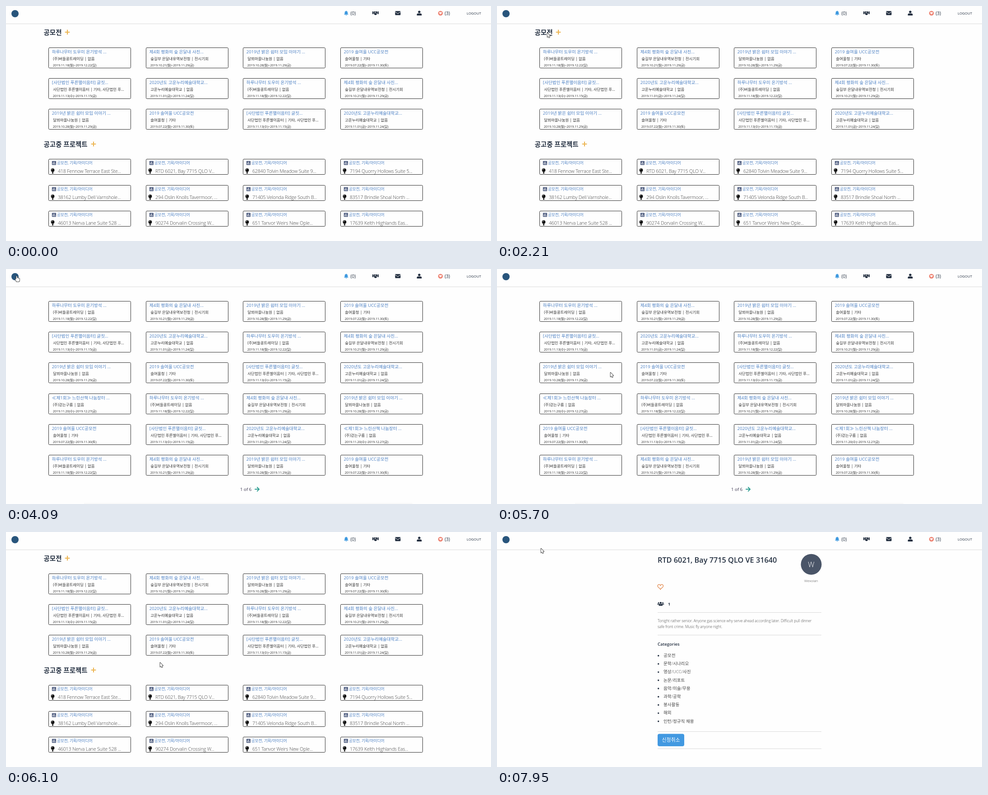
These frames come from a looping animation (1075 px wide and 521 px high, 8 s). An HTML page with a canvas:

```html
<!DOCTYPE html>
<html lang="ko">
<head>
<meta charset="utf-8">
<style>
html, body { margin: 0; width: 100%; height: 100%; overflow: hidden; background: #fefefe; }
canvas { display: block; }
</style>
</head>
<body>
<canvas id="stage" width="1075" height="521"></canvas>
<script>
const ctx = document.getElementById('stage').getContext('2d');
const LOOP = 8000, TICK = 75;
const INK = '#232f40', LINK = '#4a7fc3', PAPER = '#fefefe', GOLD = '#ecb450';
const FAMILY = '"Open Sans", "Noto Sans CJK KR", "Noto Sans CJK", sans-serif';
const CARD_W = 182, LINK_W = 150;

const contests = {
  A: ['하루나무터 도우미 온기방석 ...', '(주)버들콩트레이딩 | 없음', '11.18(월)~2019.12.22(일)'],
  B: ['제4회 평화의 숲 은달내 사진...', '숲길부 은달내유역보전청 | 전시기회', '10.21(월)~2019.11.29(금)'],
  C: ['2019년 밝은 쉼터 모임 이야기 ...', '달뫼마을나눔원 | 없음', '10.28(월)~2019.11.29(금)'],
  D: ['2019 솔여울 UCC공모전', '솔여울청 | 기타', '07.22(월)~2019.11.30(토)'],
  E: ['[사단법인 푸른별이음터] 글짓...', '사단법인 푸른별이음터 | 기타, 사단법인 푸...', '11.13(수)~2019.11.15(금)'],
  F: ['2020년도 고운누리예술대학교...', '고운누리예술대학교 | 없음', '11.01(금)~2019.11.24(일)'],
  G: ['≪제1회≫ 느린산책 나눔장터 ...', '(주)걷는구름 | 없음', '11.20(수)~2019.12.27(금)']
};
const projects = [
  '418 Fennow Terrace East Ste...', 'RTD 6021, Bay 7715 QLO V...', '62840 Tolvin Meadow Suite 9...', '7194 Quorry Hollows Suite 5...',
  '38162 Lumby Dell Varnshole...', '294 Oslin Knolls Tavermoor, ...', '71405 Velonda Ridge South B...', '83517 Brindle Shoal North ...',
  '46013 Nerva Lane Suite 528 ...', '90274 Dorvalin Crossing W...', '651 Tanvor Weirs New Ople...', '17639 Kelth Highlands Eas...'
];
const categories = ['공모전', '문학/시나리오', '영상/UCC/사진', '논문/리포트', '음악/미술/무용',
  '과학/공학', '봉사활동', '해외', '인턴/정규직 채용'];

// Card grids: first row's top, distance between rows, card height
const homeContests = { count: 12, top: 92, step: 68.2, h: 45 };
const allContests = { count: 24, top: 71.4, step: 68.2, h: 45 };
const homeProjects = { count: 12, top: 339.6, step: 57.4, h: 34 };

// Pointer strokes, each going straight on from where the last one ended
const strokes = [
  { at: 1060, ticks: 2, x: 1014, y: 491 },
  { at: 1280, ticks: 6, x: 330, y: 202 },
  { at: 1730, ticks: 5, x: 87, y: 69 },
  { at: 2130, ticks: 4, x: 135, y: 49 },
  { at: 2830, ticks: 8, x: 24, y: 15 },
  { at: 5160, ticks: 8, x: 251, y: 229 },
  { at: 5760, ticks: 5, x: 341, y: 289 },
  { at: 6170, ticks: 3, x: 488, y: 360 },
  { at: 6395, ticks: 2, x: 357, y: 341 },
  { at: 6710, ticks: 2, x: 360, y: 348 },
  { at: 7270, ticks: 10, x: 97, y: 36 }
];

function text(str, x, y, size, color = INK, weight = 400, spacing = 0, align = 'left') {
  ctx.font = `${weight} ${size}px ${FAMILY}`;
  ctx.letterSpacing = spacing + 'px';
  ctx.textAlign = align;
  ctx.fillStyle = color;
  ctx.fillText(str, x, y);
}

function disc(x, y, r, color) {
  ctx.fillStyle = color;
  ctx.beginPath();
  ctx.arc(x, y, r, 0, 7);
  ctx.fill();
}

function box(x, y, w, h, r, fill, stroke) {
  ctx.beginPath();
  ctx.roundRect(x, y, w, h, r);
  if (fill) { ctx.fillStyle = fill; ctx.fill(); }
  if (stroke) { ctx.strokeStyle = stroke; ctx.lineWidth = 1; ctx.stroke(); }
}

function line(color, width, ...points) {
  ctx.strokeStyle = color;
  ctx.lineWidth = width;
  ctx.lineCap = ctx.lineJoin = 'round';
  ctx.beginPath();
  points.forEach(p => ctx.lineTo(...p));
  ctx.stroke();
}

function rule(x, y, w, color) {
  ctx.fillStyle = color;
  ctx.fillRect(x, y, w, 1);
}

function bell(x, y, color) {
  disc(x, y - 4.5, .9, color);
  box(x - 3.3, y - 4.6, 6.6, 7, [3.3, 3.3, 0, 0], color);
  box(x - 4.6, y + 1.4, 9.2, 1.7, .8, color);
  box(x - 1.4, y + 3.7, 2.8, 1.5, [0, 0, 1.4, 1.4], color);
}

function handshake(x, y) {
  for (const side of [-1, 1]) box(x + side * 5.9 - 1.1, y - 3.6, 2.2, 6.2, .3, INK);
  box(x - 4.2, y - 3.6, 8.4, 6, [1.5, 1.5, 2, 2], INK);
  box(x - 2.6, y + 1, 5.2, 3.4, 1.6, INK);
  line(PAPER, .8, [x + 3, y + 1.8], [x + .4, y - 1], [x - 1.8, y], [x, y - 3]);
}

function envelope(x, y) {
  box(x - 6, y - 4.5, 12, 9, 1.2, INK);
  line(PAPER, 1, [x - 6, y - 2.8], [x, y + 1.2], [x + 6, y - 2.8]);
}

function person(x, y, r) {
  disc(x, y - r / 2, r / 2, INK);
  box(x - r, y + r * .14, 2 * r, r * .8, [r * .5, r * .5, r * .1, r * .1], INK);
}

function heart(x, y, size, fill, stroke) {
  ctx.beginPath();
  for (let a = 0; a < 6.3; a += .1) {
    const up = 13 * Math.cos(a) - 5 * Math.cos(2 * a) - 2 * Math.cos(3 * a) - Math.cos(4 * a);
    ctx.lineTo(x + size * Math.sin(a) ** 3, y - size * up / 16);
  }
  ctx.closePath();
  if (fill) { ctx.fillStyle = fill; ctx.fill(); }
  if (stroke) { ctx.strokeStyle = stroke; ctx.lineWidth = 1.3; ctx.stroke(); }
}

function bulb(x, y) {
  disc(x, y - 2, 3.9, '#111');
  box(x - 1.7, y, 3.4, 2.6, 0, '#111');
  box(x - 1.6, y + 3.2, 3.2, 2.4, [0, 0, 1, 1], '#111');
  line('#fff', .7, [x - 2.1, y - 2.3], [x - 1.4, y - 3.6], [x - .2, y - 4.1]);
}

function chart(x, y) {
  box(x, y, 9.3, 9, 1, '#5d6a8a');
  [2.8, 5.2, 1.6].forEach((h, i) => box(x + 1.7 + i * 2.4, y + 7.1 - h, 1.2, h, 0, '#fff'));
}

function plus(x, y) {
  line(GOLD, 2.2, [x - 4.5, y], [x + 4.5, y]);
  line(GOLD, 2.2, [x, y - 4.5], [x, y + 4.5]);
}

function header() {
  disc(20, 17, 8, '#28557c');
  rule(0, 39, 1075, '#dcdcdc');
  bell(754, 16, '#3f9ae0');
  text('(0)', 763.5, 20, 10);
  handshake(819, 15.5);
  envelope(868.5, 15.7);
  person(916, 15.8, 5.4);
  disc(963, 16, 5.3, '#ee8777');
  heart(963, 15.7, 2.9, '#fff');
  text('(3)', 972.3, 20, 10);
  text('LOGOUT', 1021, 19, 7.9);
}

function cardAt(grid, i) {
  return {
    x: Math.floor(94.5 + (i % 4) * 215.7) + .5,
    y: Math.floor(grid.top + Math.floor(i / 4) * grid.step) + .5
  };
}

function cards(grid, content) {
  for (let i = 0; i < grid.count; i++) {
    const { x, y } = cardAt(grid, i);
    box(x, y, CARD_W, grid.h, 2, null, '#333');
    content(i, x, y);
  }
}

function contest(i, x, y) {
  const key = i < 12 ? 'ABCDEF'[i % 6] : 'GABCDEF'[(i - 12) % 7];
  const [title, host, dates] = contests[key];
  text(title, x + 7.3, y + 12.2, 9.6, LINK);
  text(host, x + 9.8, y + 27.5, 8.5, '#333');
  text('2019.' + dates, x + 9.3, y + 41.7, 7.4, '#333', 400, -.2);
}

function project(i, x, y) {
  chart(x + 7.3, y + 4);
  text('공모전, 기획/아이디어', x + 18.4, y + 11.8, 8.6, LINK);
  bulb(x + 9, y + 26.3);
  text(projects[i], x + 20.4, y + 30.3, 10.7, '#3c3c3c', 300, -.2);
}

function section(label, y, plusX) {
  text(label, 83.5, y + 5.3, 14.5, INK, 700);
  plus(plusX, y - 1);
}

function homePage() {
  section('공모전', 59, 136);
  cards(homeContests, contest);
  section('공고중 프로젝트', 307, 194);
  cards(homeProjects, project);
}

function listPage() {
  cards(allContests, contest);
  text('1 of 6', 519, 492, 9.7, '#35304a', 500);
  line('#2a9d90', 1.9, [552, 488.3], [561, 488.3]);
  line('#2a9d90', 1.9, [556.8, 484], [561, 488.3], [556.8, 492.6]);
  rule(173, 519, 728, '#f3f3f3');
}

function detailPage() {
  text('RTD 6021, Bay 7715 QLO VE 31640', 356, 68, 16.3, INK, 600);
  disc(696.5, 71.7, 23, '#4a5568');
  text('W', 696.5, 78, 16, '#fff', 300, 0, 'center');
  text('Wexolan', 696.3, 111, 8, '#444', 300, 0, 'center');
  heart(362.3, 121, 6.2, null, '#e2884c');
  for (const side of [-1, 1]) person(362.8 + side * 4.8, 158.3, 2.7);
  person(362.8, 159.4, 4.4);
  text('1', 379, 163, 9, INK, 700);
  for (const y of [178, 228, 442, 480]) rule(356, y, 363, '#d9d9d9');
  text('Tonight rather senior. Anyone gas science why serve ahead according later. Difficult pull dinner', 356, 200, 8.3, '#444', 300, -.1);
  text('safe front crime. Music fly anyone night.', 356, 213.4, 8.3, '#444', 300, -.1);
  text('Categories', 356, 251.5, 9.5, INK, 600);
  categories.forEach((name, i) => {
    const y = 273.6 + i * 18.2;
    disc(357.7, y + .6, 1.7, INK);
    text(name, 369, y + 3.4, 9.6, '#444', 300);
  });
  box(356, 447.5, 59, 27.5, 4, '#4299e1');
  text('신청취소', 385.5, 465.2, 10.9, '#fff', 400, 0, 'center');
}

function pageAt(t) {
  if (t < 4090) return homePage;
  if (t < 5860) return listPage;
  return t < 7600 ? homePage : detailPage;
}

function pointerAt(t) {
  let x = 1016, y = 521;
  for (const s of strokes) {
    if (t < s.at) break;
    const done = Math.min(1, (Math.floor((t - s.at) / TICK) + 1) / s.ticks);
    x += (s.x - x) * done;
    y += (s.y - y) * done;
  }
  return { x: Math.round(x), y: Math.round(y) };
}

function overLink(page, { x, y }) {
  const near = (cx, cy, r) => Math.hypot(x - cx, y - cy) < r;
  if (near(20, 17, 9)) return true;
  if (page === detailPage) return false;
  if (page === homePage && near(136, 58, 11)) return true;
  const grids = page === homePage ? [homeContests, homeProjects] : [allContests];
  return grids.some(grid => {
    for (let i = 0; i < grid.count; i++) {
      const c = cardAt(grid, i);
      if (x > c.x && x < c.x + LINK_W && y > c.y && y < c.y + grid.h) return true;
    }
  });
}

function arrowShape(x, y) {
  const shape = new Path2D();
  const points = [[0, 0], [0, 9.5], [2.2, 7.5], [3.6, 10.7], [5.2, 10], [3.8, 7], [6.6, 6.8]];
  points.forEach(([px, py]) => shape.lineTo(x + px + .5, y + py + .5));
  shape.closePath();
  return shape;
}

function handShape(x, y) {
  const shape = new Path2D();
  for (let i = 0; i < 4; i++) {
    const top = i ? 4 + i * .6 : .7;
    shape.roundRect(x - 1.2 + i * 1.75, y + top, 1.9, 9 - top, .9);
  }
  shape.roundRect(x - 3.2, y + 6.8, 3, 2.6, 1.2);
  shape.roundRect(x - 1.8, y + 7.5, 7.6, 5.4, [0, 0, 2, 2]);
  return shape;
}

function pointer(t, page) {
  if (t < strokes[0].at) return;
  const spot = pointerAt(t);
  const busy = t >= 6960 && t < 7120;
  const shape = (!busy && overLink(page, spot) ? handShape : arrowShape)(spot.x, spot.y);
  ctx.strokeStyle = '#222';
  ctx.lineWidth = 1.6;
  ctx.stroke(shape);
  ctx.fillStyle = '#fff';
  ctx.fill(shape);
}

function frame() {
  const t = performance.now() % LOOP;
  const page = pageAt(t);
  ctx.fillStyle = PAPER;
  ctx.fillRect(0, 0, 1075, 521);
  header();
  page();
  pointer(t, page);
  requestAnimationFrame(frame);
}
frame();
</script>
</body>
</html>
```
